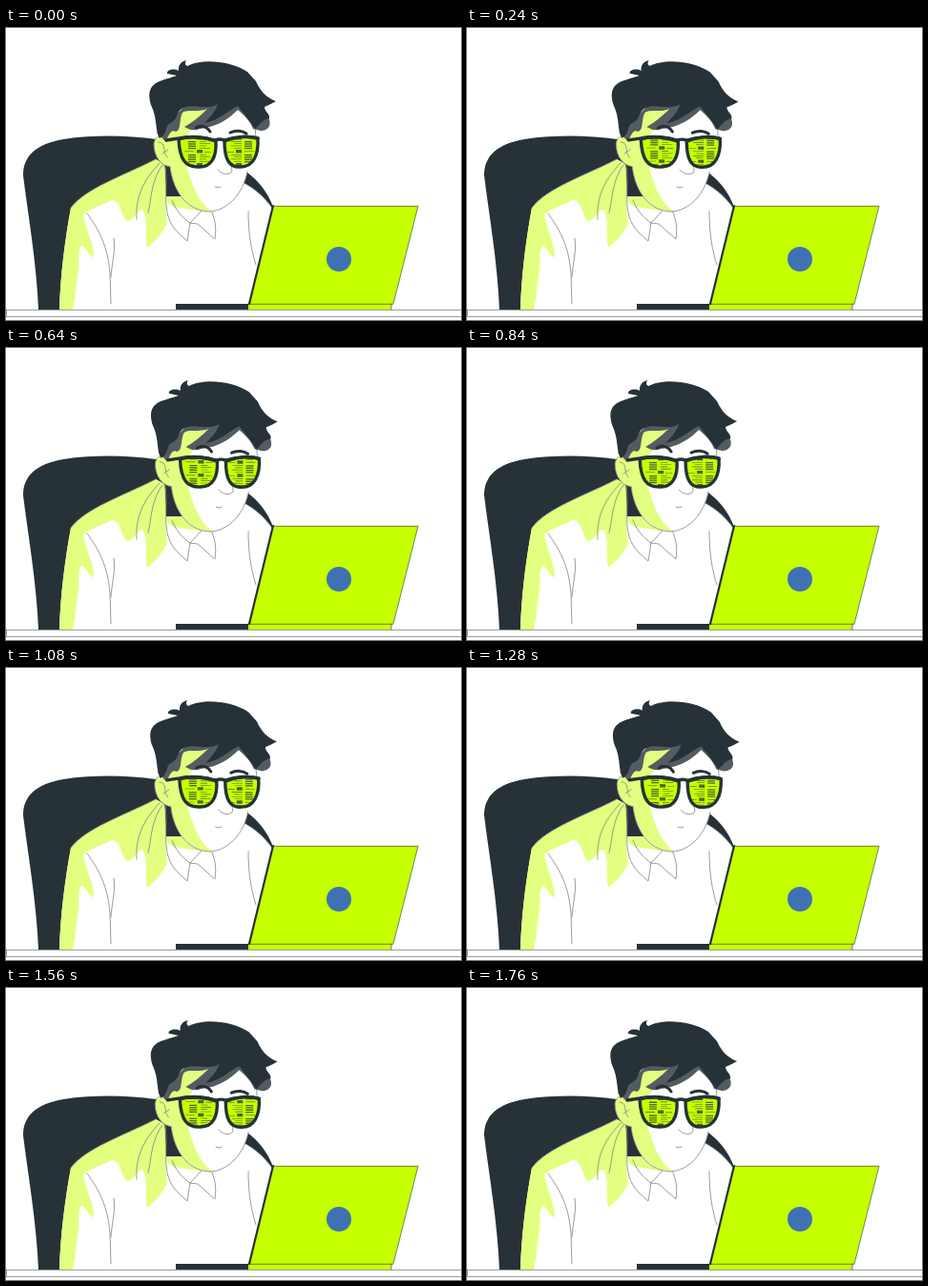
An HTML page that plays this animation: 477x307 px, repeating every 1.8 s.

```html
<!DOCTYPE html>
<html lang="en">
<head>
<meta charset="utf-8">
<title>At the laptop</title>
<style>
  html, body { margin: 0; width: 100%; height: 100%; overflow: hidden; background: #fff; }
  svg { display: block; width: 477px; height: 307px; }
  .dark { fill: #263238; }
  .lime { fill: #c6ff00; }
  .pale { fill: #e2ff80; }
  .grey { fill: #535c61; }
  .white { fill: #fff; }
  .line { fill: none; stroke: #7c8488; stroke-width: .8; stroke-linecap: round; stroke-linejoin: round; }
  .ink { fill: none; stroke: #263238; stroke-linecap: round; stroke-linejoin: round; }
</style>
</head>
<body>
<svg viewBox="0 0 477 307">
  <defs>
    <path id="lensL" d="M181 117C193 113 209 115 220 119C221 136 215 146 203 146C188 147 182 138 181 117Z"/>
    <path id="lensR" d="M229 119C240 115 254 113 264 116C265 134 259 146 246 146C234 147 229 138 229 119Z"/>
    <clipPath id="glass"><use href="#lensL"/><use href="#lensR"/></clipPath>
  </defs>

  <g id="chair">
    <path class="dark" d="M34 296C32 246 23 196 18 155C18 134 32 122 60 117C94 112 128 113 158 117L235 142C259 152 273 169 280 188V205H150L70 296Z"/>
  </g>

  <g id="shirt">
    <path class="white" d="M56 296C57 260 62 221 68 189C84 168 122 156 157 138L166 143L168 178H205L243 160C256 165 269 175 279 189L254 296Z"/>
    <path class="pale" d="M56 296C57 260 62 221 68 189C84 168 122 156 157 138L166 143C169 165 166 190 169 205C164 217 155 225 148 231C145 217 149 203 144 192C139 187 134 203 128 203C121 202 121 180 111 181C102 186 88 190 81 196C83 211 93 228 92 241C86 240 84 229 79 229C74 236 78 244 76 254C74 266 73 282 70 296Z"/>
    <path class="pale" d="M168 177H192L214 189L208 194L196 191L171 190Z"/>
    <path class="white" d="M169 184C169 199 177 214 190 224L193 204L201 206L219 222L218 190L201 192L176 188Z"/>
    <path class="line" d="M167 144C170 160 165 181 170 198C174 211 182 217 190 224L193 205C184 199 177 190 174 181M193 205L201 206L219 222C221 210 219 199 214 190M193 205L205 192"/>
    <path class="line" d="M161 142C148 156 135 174 137 201M164 144C152 160 153 178 149 194M85 195C98 213 107 230 109 258L110 290M113 221C115 236 111 245 110 262M254 193C254 215 257 234 262 249M68 189C84 168 122 156 157 138M279 189C269 175 256 165 243 160"/>
  </g>

  <g id="head">
    <path class="white" d="M170 107L185 82L246 78L259 96C263 113 261 133 253 151C249 173 233 192 213 193C187 192 174 167 172 145C164 133 164 119 170 107Z"/>
    <path class="pale" d="M170 108C177 100 181 88 187 85L211 84C208 95 197 104 191 112L184 119C189 133 189 146 193 157C198 172 205 187 217 193C190 194 174 167 172 145C166 131 166 119 170 108Z"/>
    <path class="line" d="M172 145C174 167 187 192 213 193C233 192 249 173 253 151M259 96Q262 105 262 115"/>
    <path class="pale" d="M173 119C165 112 156 113 155 122C155 135 162 145 174 146Z"/>
    <path class="line" d="M172 118C164 111 155 113 155 122C155 135 162 145 172 146M160 120C169 121 163 129 169 136M164 132L170 128"/>
    <path class="grey" d="M158 110L190 80L246 76C258 83 266 90 274 92C280 102 275 108 267 108L259 106C256 98 250 92 243 86C234 95 222 104 203 106C196 109 191 106 187 104C196 99 203 93 211 85C202 89 190 85 185 89C181 97 184 107 178 109C172 106 171 114 167 119Z"/>
    <path class="dark" d="M161 116C156 108 159 95 152 81C149 70 149 61 161 56C169 53 174 52 179 50L169 48C168 44 176 42 181 45C180 39 184 35 189 34C187 37 188 39 190 40C205 32 235 34 253 46L262 56C267 67 273 73 283 77C278 80 273 82 271 83C271 88 277 90 276 95C268 96 265 103 261 106C256 98 250 91 243 82C232 87 224 97 208 100C215 93 220 87 222 80C211 87 197 79 186 84C177 88 182 95 172 100C166 103 170 111 161 116Z"/>
    <path class="ink" stroke-width="3" d="M199 105C205 101 211 104 214 109M235 110C241 107 248 108 252 111"/>
    <path class="line" d="M234 133C233 142 239 148 236 152C231 155 225 153 222 149M219 167Q222 169 225 167"/>
    <use href="#lensL" class="lime"/><use href="#lensR" class="lime"/>
    <g clip-path="url(#glass)"><g id="code" class="dark" opacity=".75"></g></g>
    <g class="ink" stroke-width="3.4">
      <use href="#lensL"/><use href="#lensR"/>
      <path d="M168 118L181 116C195 113 210 115 219 118Q224 116 229 118C240 114 254 113 264 116"/>
    </g>
  </g>

  <g id="desk">
    <path class="white" d="M0 296H477V304H0Z"/>
    <path class="line" d="M0 296.5H477M0 303.5H477M.5 296V303"/>
    <path class="dark" d="M178 290H256V296H178Z"/>
    <path class="lime" d="M254 290H404V296H254Z"/>
    <path class="lime" d="M280 187H432L406 290H255Z"/>
    <path class="ink" stroke-width=".6" d="M280 187.3H432L406 290.3H254M404 290V296"/>
    <path class="ink" stroke-width="2.2" stroke-linecap="butt" d="M280 187L255 290"/>
    <circle cx="349" cy="243" r="13" fill="#4071b2"/>
  </g>
</svg>
<script>
const LOOP = 1800, SWAY = 900, STEP = 40, PITCH = 14;
const head = document.getElementById('head');
const code = document.getElementById('code');

function bar(x, y, width, height) {
  const rect = document.createElementNS('http://www.w3.org/2000/svg', 'rect');
  Object.entries({ x, y, width, height }).forEach(([k, v]) => rect.setAttribute(k, v));
  code.append(rect);
}

// Repeating block of mirrored code lines, one per lens.
for (let y = 105; y < 165; y += PITCH) {
  for (let row = 0; row < 4; row++) {
    const top = y + row * 2.3;
    bar(191, top, 8, 1.3);
    bar(203, top, 7 + row % 2 * 4, .6);
    bar(250, top, 8, 1.3);
    bar(236 + row % 2 * 3, top, 11 - row % 2 * 3, .6);
  }
  bar(200, y + 9, 6, 3.4);
  bar(241, y + 9, 6, 3.4);
  bar(187, y + 10.5, 10, .6);
  bar(208, y + 11, 7, .6);
  bar(232, y + 11, 7, .6);
  bar(250, y + 10.5, 10, .6);
}

function draw(time) {
  const t = Math.floor(time % LOOP / STEP) * STEP;
  const phase = t % SWAY / SWAY;
  const lean = (1 - Math.cos(phase * 2 * Math.PI)) / 2;
  head.setAttribute('transform', `rotate(${lean * .5} 200 390)`);
  code.setAttribute('transform', `translate(0 ${-phase * PITCH})`);
}

const start = performance.now();
function tick() {
  draw(performance.now() - start);
  requestAnimationFrame(tick);
}
tick();
</script>
</body>
</html>
```
